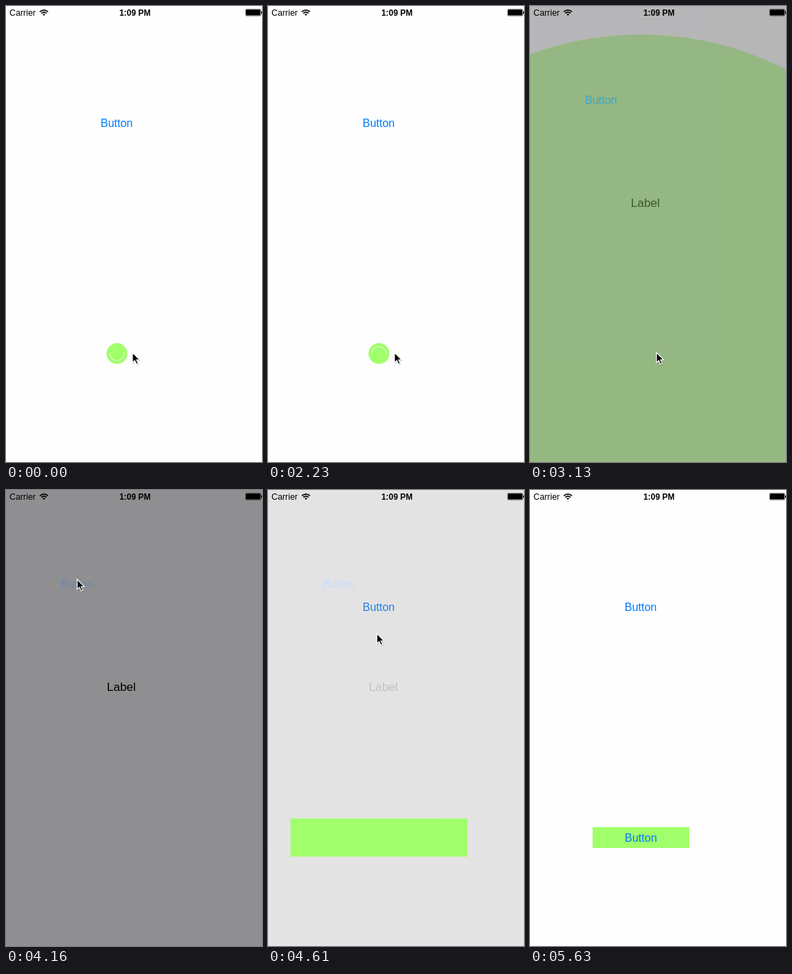
Animation of 368x656 px, one loop 6270 ms. Source, as an HTML page:

```html
<!DOCTYPE html>
<html lang="en">
<head>
<meta charset="utf-8">
<title>Button transition</title>
<style>
  html, body { margin: 0; width: 100%; height: 100%; overflow: hidden; background: #fefefe; }
  svg { display: block; width: 368px; height: 656px; }
  text { font: 16px "Liberation Sans", Arial, sans-serif; }
  .link { fill: #007aff; }
</style>
</head>
<body>
<svg viewBox="0 0 368 656">
  <rect width="368" height="656" fill="#fefefe"/>
  <text class="link" x="136" y="174">Button</text>
  <g id="under"></g>
  <g id="modal">
    <rect width="368" height="656" fill="#8f8f91"/>
    <text id="back" class="link" x="79" y="141">Button</text>
    <text x="145" y="289" style="font-size:17px">Label</text>
  </g>
  <g id="over"></g>
  <g id="submit">
    <rect id="shape"/>
    <path id="spinner" fill="none" stroke="#fff" stroke-width="1"/>
    <text id="title" class="link" x="136.3" y="506">Button</text>
  </g>
  <g id="status">
    <text x="5" y="14" style="font-size:12.3px">Carrier</text>
    <g fill="none" stroke="#000" stroke-width="1.7">
      <path d="M48.6 8.3 Q54.5 3.3 60.4 8.3"/>
      <path d="M50.8 10.5 Q54.5 7.4 58.2 10.5"/>
    </g>
    <path d="M52.5 11.9 Q54.5 10.4 56.5 11.9 L54.5 14 Z"/>
    <text x="163" y="14" style="font-size:11.9px;font-weight:bold">1:09 PM</text>
    <rect x="344.4" y="4.6" width="21.8" height="9.6" rx="1.4" fill="none" stroke="#000" stroke-width=".5"/>
    <rect x="345" y="5.2" width="20.6" height="8.4" rx=".8"/>
    <path d="M366.8 7.8 h1.2 v3.4 h-1.2 z"/>
  </g>
  <g id="cursor">
    <path d="M0 0 V14.5 L3.3 11.5 L5.7 16.7 L8.1 15.6 L5.8 10.6 H10.4 Z" opacity=".18" transform="translate(.8 1.4)" stroke="#000"/>
    <path d="M0 0 V14.5 L3.3 11.5 L5.7 16.7 L8.1 15.6 L5.8 10.6 H10.4 Z" stroke="#fff" stroke-width="1.2"/>
  </g>
</svg>
<script>
const $ = id => document.getElementById(id);
const LOOP = 6270, CX = 159.5, CY = 500;
const GREEN = [160, 255, 107], RED = [233, 62, 6];

// The picture advances in held steps of 150 ms, a few of them 140 ms.
const short = [8, 15, 23, 28, 33, 36, 38];
const ticks = [0];
for (let k = 1; k <= 38; k++) ticks.push(ticks[k - 1] + (short.includes(k) ? 140 : 150));

// time, x, y of the pointer tip
const path = [
  [0, 181.8, 498.5], [3130, 181.8, 498.5], [3280, 160, 410], [3420, 122, 280],
  [3570, 102.3, 187.5], [3720, 102.3, 128.5], [4310, 102.3, 128.5], [4460, 116, 150],
  [4610, 156.5, 206.5], [4760, 200, 292], [4900, 258, 405], [5050, 315, 530],
  [5200, 342.3, 601], [5340, 344, 625], [5490, 345.5, 645], [5630, 347, 680]
];

const mix = (a, b, p) => a + (b - a) * p;
const span = (t, from, length) => Math.min(1, Math.max(0, (t - from) / length));
const smooth = p => p * p * (3 - 2 * p);
const set = (el, attrs) => { for (const k in attrs) el.setAttribute(k, attrs[k]); };

function pointer(t) {
  const i = path.findIndex(p => p[0] > t);
  if (i < 0) return path[path.length - 1].slice(1);
  const a = path[i - 1], b = path[i], p = (t - a[0]) / (b[0] - a[0]);
  return [mix(a[1], b[1], p), mix(a[2], b[2], p)];
}

function modalAlpha(t) {
  if (t < 2710) return 0;
  if (t < 4295) return mix(0.42, 1, smooth(span(t, 2710, 1000)));
  return mix(0.3, 0, smooth(span(t, 4310, 1000)));
}

function button(t) {
  if (t < 4295) {
    const grow = span(t, 2680, 353) ** 3;
    return { scale: 1 + 29.6 * grow, width: 30, corner: 15, color: GREEN };
  }
  const open = smooth(span(t, 4300, 290));
  return {
    scale: mix(30.6, 1, smooth(span(t, 4295, 350))),
    width: mix(30, 139, open),
    corner: 15 * (1 - open),
    color: RED.map((c, i) => Math.round(mix(c, GREEN[i], open)))
  };
}

function arc(t) {
  const mid = 85 + t * 360 / 403;
  const at = deg => {
    const r = deg * Math.PI / 180;
    return `${CX + 10.2 * Math.cos(r)} ${CY + 10.2 * Math.sin(r)}`;
  };
  return `M${at(mid - 95)} A10.2 10.2 0 1 1 ${at(mid + 95)}`;
}

function draw(t) {
  const b = button(t), w = b.width * b.scale, h = 30 * b.scale;
  set($("shape"), {
    x: CX - w / 2, y: CY - h / 2, width: w, height: h,
    rx: b.corner * b.scale, fill: `rgb(${b.color})`
  });
  const layer = $(t < 4295 ? "under" : "over");
  if ($("submit").parentNode !== layer) layer.append($("submit"));
  set($("spinner"), { d: arc(t), opacity: t < 2680 ? 0.9 : 0 });
  set($("title"), { opacity: t < 4760 ? 0 : 1 });
  set($("modal"), { opacity: modalAlpha(t) });
  set($("back"), { opacity: t >= 4160 && t < 4310 ? 0.25 : 1 });
  set($("cursor"), { transform: `translate(${pointer(t)})` });
}

const start = performance.now();
function frame() {
  const t = (performance.now() - start) % LOOP;
  draw(ticks.filter(k => k <= t).pop());
  requestAnimationFrame(frame);
}
frame();
</script>
</body>
</html>
```
